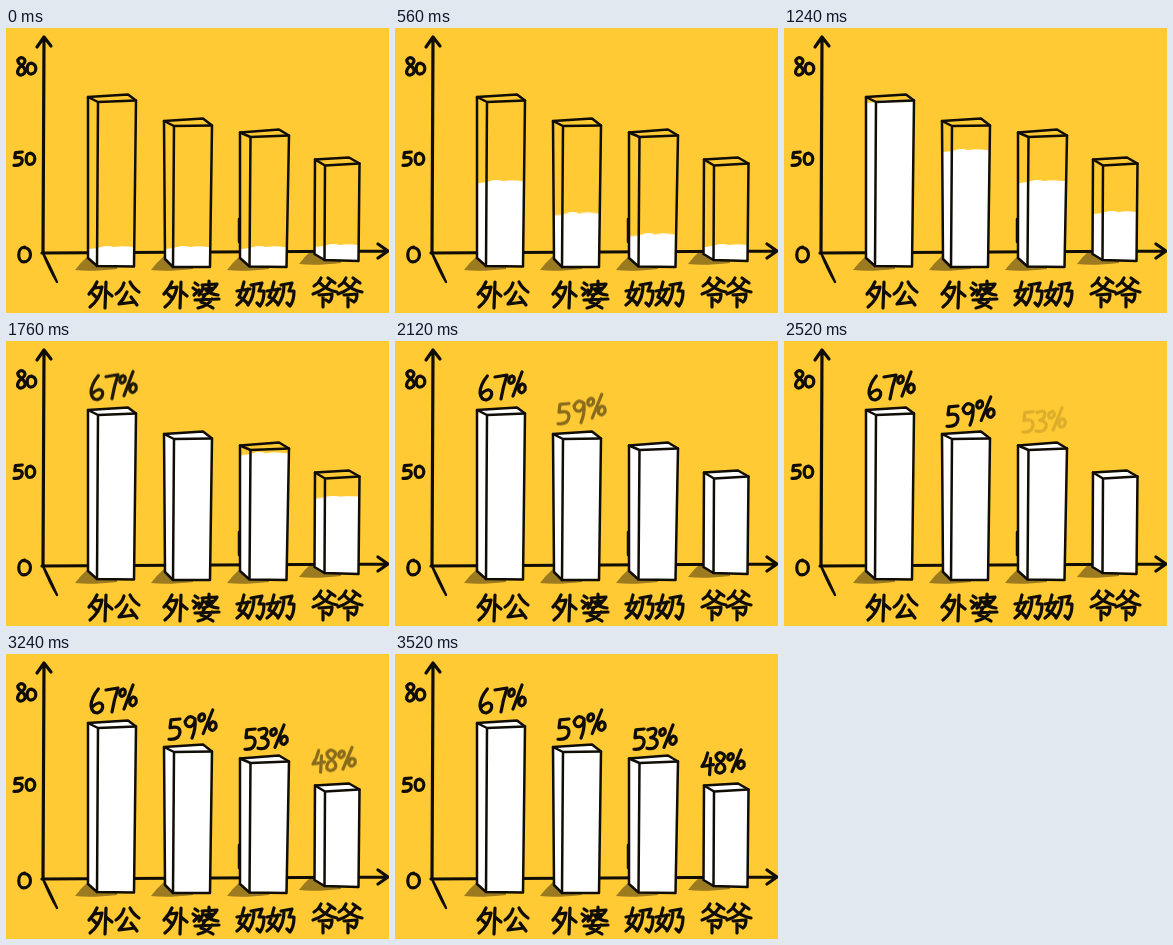
An HTML page for the animation above (3840 ms loop, 383 px wide and 285 px high).

```html
<!DOCTYPE html>
<html lang="zh">
<head>
<meta charset="utf-8">
<title>Bar chart</title>
<style>
html, body { margin: 0; width: 100%; height: 100%; overflow: hidden; background: #ffca33; }
svg { display: block; width: 100%; height: 100%; }
.ink { fill: none; stroke: #100c06; stroke-width: 2.5; stroke-linecap: round; stroke-linejoin: round; }
.bold { stroke-width: 3.2; }
.glyph path { vector-effect: non-scaling-stroke; }
.face { fill: #ffca33; }
.shade { fill: #9c7a20; }
.level, .value { animation: 3840ms infinite; }
.level { fill: #fff; }

/* Each level waits, climbs the front, then covers the lid. */
#l1 { animation-name: rise1; }
#l2 { animation-name: rise2; }
#l3 { animation-name: rise3; }
#l4 { animation-name: rise4; }
@keyframes rise1 {
  0% { transform: translateY(219px); animation-timing-function: steps(31); }
  32.292% { transform: translateY(73px); animation-timing-function: steps(1); }
  33.333%, 100% { transform: translateY(60px); }
}
@keyframes rise2 {
  0%, 5.208% { transform: translateY(219px); animation-timing-function: steps(33); }
  39.583% { transform: translateY(96px); animation-timing-function: steps(1); }
  40.625%, 100% { transform: translateY(84px); }
}
@keyframes rise3 {
  0%, 10.417% { transform: translateY(219px); animation-timing-function: steps(35); }
  46.875% { transform: translateY(109px); animation-timing-function: steps(1); }
  47.917%, 100% { transform: translateY(95px); }
}
@keyframes rise4 {
  0%, 16.667% { transform: translateY(217px); animation-timing-function: steps(36); }
  54.167% { transform: translateY(138px); animation-timing-function: steps(1); }
  55.208%, 100% { transform: translateY(123px); }
}

/* Values fade in one after another, settling downwards. */
.value { animation-timing-function: steps(14); }
#v1 { animation-name: fade1; }
#v2 { animation-name: fade2; }
#v3 { animation-name: fade3; }
#v4 { animation-name: fade4; }
@keyframes fade1 { 0%, 32.292% { opacity: 0; transform: translateY(-5px); } 46.875%, 100% { opacity: 1; transform: none; } }
@keyframes fade2 { 0%, 47.917% { opacity: 0; transform: translateY(-5px); } 62.5%, 100% { opacity: 1; transform: none; } }
@keyframes fade3 { 0%, 63.542% { opacity: 0; transform: translateY(-5px); } 78.125%, 100% { opacity: 1; transform: none; } }
@keyframes fade4 { 0%, 77.083% { opacity: 0; transform: translateY(-5px); } 91.667%, 100% { opacity: 1; transform: none; } }
</style>
</head>
<body>
<svg viewBox="0 0 383 285" preserveAspectRatio="none" role="img" aria-label="外公 67%, 外婆 59%, 奶奶 53%, 爷爷 48%">
  <defs>
    <!-- Handwritten digits, 12 by 24 -->
    <g class="glyph">
      <path id="n0" d="M6 0C-2 1-1 24 5 24C14 24 14 0 5 1"/>
      <path id="n3" d="M1 2Q10-2 10 4Q9 10 4 11Q13 12 11 19Q8 25 0 23"/>
      <path id="n4" d="M6 0Q4 9 0 15L12 13M9 6L8 24"/>
      <path id="n5" d="M11 0L2 1L1 10Q11 7 11 15Q10 24 0 23"/>
      <path id="n6" d="M7 0Q0 9 0 17Q1 24 6 24Q12 22 11 16Q8 11 1 18"/>
      <path id="n7" d="M0 2L12 0Q8 12 6 24"/>
      <path id="n8" d="M10 3Q5-2 1 4Q1 8 6 11Q13 16 10 21Q5 26 1 21Q0 15 7 11Q12 6 10 3"/>
      <path id="n9" d="M10 4Q4-2 0 7Q1 13 6 12Q10 10 10 4Q11 14 7 24"/>
      <path id="pc" d="M14 0L5 24M4 4Q0 5 1 10Q3 13 6 9Q7 4 4 4M14 12Q10 14 11 19Q14 23 17 18Q18 12 14 12"/>
    </g>
    <!-- Handwritten characters: 外 公 婆 奶 爷 -->
    <path id="wai" d="M9 0Q6 7 1 12M7 6L14 5Q12 17 2 25M5 12L9 16M18 0L17 26M18 9L24 14"/>
    <path id="gong" d="M8 2Q6 9 0 13M14 1Q17 7 23 11M11 11Q8 18 3 23L19 21M15 16L21 24"/>
    <path id="po" d="M2 2L5 4M0 7L3 9M1 14L6 9M9 4L24 3L22 6M10 4Q10 10 6 14M16 0V8M12 8L21 7Q18 12 10 14M13 9Q17 13 25 14M2 19L26 18M12 14L8 21Q14 23 20 27M19 18Q15 25 5 27"/>
    <path id="nai" d="M7 3Q5 12 2 18Q7 20 11 25M11 10Q8 20 0 26M0 12L13 10M14 6L25 4L22 12L27 12Q27 22 23 27L20 24M17 6Q17 18 11 26"/>
    <path id="ye" d="M8 1Q6 6 1 9M15 1L22 6M17 5Q12 13 0 17M7 6Q13 13 24 15M6 18L19 17Q19 23 16 25L13 23M10 18V30"/>

    <path id="wave" d="M-3 2Q8 2 14 0T27 0Q34-1 40-.5T54 0V185H-3Z"/>

    <path id="b1" d="M82 69L122 66.5L130 72.5L128 238.5L91 238L82 230Z"/>
    <path id="b2" d="M158 93L197 90.5L206 97.5L204 239L167 239L159 231Z"/>
    <path id="b3" d="M234 104.5L273 101.5L283 107.5L280.5 239L243.5 238.5L234 230Z"/>
    <path id="b4" d="M309 131.5L343 129.5L353.5 135.5L352.5 233L318.5 232L308.5 226Z"/>
    <clipPath id="c1"><use href="#b1"/></clipPath>
    <clipPath id="c2"><use href="#b2"/></clipPath>
    <clipPath id="c3"><use href="#b3"/></clipPath>
    <clipPath id="c4"><use href="#b4"/></clipPath>
    <path id="shadow" d="M13 0Q5 7 0 14Q16 16 42 13V6Z"/>
  </defs>

  <rect width="383" height="285" class="face"/>

  <!-- Shadows and axes -->
  <g class="shade">
    <use href="#shadow" x="69" y="228"/>
    <use href="#shadow" x="145" y="228"/>
    <use href="#shadow" x="221" y="228"/>
    <use href="#shadow" x="293" y="222"/>
  </g>
  <g class="ink bold">
    <path d="M38 11L37 224M31 19L38 9L45 18"/>
    <path d="M36 225L381 223M372 216L382 223L372 230"/>
    <path d="M37 225Q43 236 51 254Q44 242 37 225Z" style="stroke-width:2.4"/>
  </g>

  <!-- Bars -->
  <g>
    <use href="#b1" class="face"/>
    <g clip-path="url(#c1)"><g transform="translate(81)"><use href="#wave" id="l1" class="level"/></g></g>
    <use href="#b1" class="ink"/>
    <path class="ink" d="M82 69L92 74L130 72.5M92 74L91 238"/>
  </g>
  <g>
    <use href="#b2" class="face"/>
    <g clip-path="url(#c2)"><g transform="translate(157)"><use href="#wave" id="l2" class="level"/></g></g>
    <use href="#b2" class="ink"/>
    <path class="ink" d="M158 93L168 98L206 97.5M168 98L167 239"/>
  </g>
  <g>
    <use href="#b3" class="face"/>
    <g clip-path="url(#c3)"><g transform="translate(233)"><use href="#wave" id="l3" class="level"/></g></g>
    <use href="#b3" class="ink"/>
    <path class="ink" d="M234 104.5L244.5 109L283 107.5M244.5 109L243.5 238M233 191V214"/>
  </g>
  <g>
    <use href="#b4" class="face"/>
    <g clip-path="url(#c4)"><g transform="translate(307)"><use href="#wave" id="l4" class="level"/></g></g>
    <use href="#b4" class="ink"/>
    <path class="ink" d="M309 131.5L319 137.5L353.5 135.5M319 137.5L318.5 232"/>
  </g>

  <!-- Scale and names -->
  <g class="ink bold">
    <use href="#n8" transform="translate(11 29) scale(.75 .77)"/>
    <use href="#n0" transform="translate(21 35) scale(.75 .46)"/>
    <use href="#n5" transform="translate(8 124) scale(.75 .58)"/>
    <use href="#n0" transform="translate(20 125) scale(.75 .48)"/>
    <use href="#n0" transform="translate(12.5 219) scale(1.02 .62)"/>
    <use href="#wai" x="82" y="254"/>
    <use href="#gong" x="110" y="253"/>
    <use href="#wai" x="157" y="254"/>
    <use href="#po" x="187" y="253"/>
    <use href="#nai" x="231" y="251"/>
    <use href="#nai" x="261" y="251"/>
    <use href="#ye" x="307" y="249"/>
    <use href="#ye" x="332" y="249"/>
  </g>

  <!-- Values -->
  <g class="ink bold">
    <g id="v1" class="value">
      <use href="#n6" transform="translate(85 35) scale(1.05 1)"/>
      <use href="#n7" transform="translate(100 34)"/>
      <use href="#pc" transform="translate(113 31)"/>
    </g>
    <g id="v2" class="value">
      <use href="#n5" transform="translate(163 65) scale(1 .88)"/>
      <use href="#n9" transform="translate(179 61) scale(1 .96)"/>
      <use href="#pc" transform="translate(192 56) scale(1.05 .98)"/>
    </g>
    <g id="v3" class="value">
      <use href="#n5" transform="translate(239 75) scale(.92 .88)"/>
      <use href="#n3" transform="translate(252 74) scale(.9 .88)"/>
      <use href="#pc" transform="translate(264 71) scale(1 .93)"/>
    </g>
    <g id="v4" class="value">
      <use href="#n4" transform="translate(307 99) scale(.95 .9)"/>
      <use href="#n8" transform="translate(320 98) scale(.9)"/>
      <use href="#pc" transform="translate(332 96) scale(1 .9)"/>
    </g>
  </g>
</svg>
</body>
</html>
```
